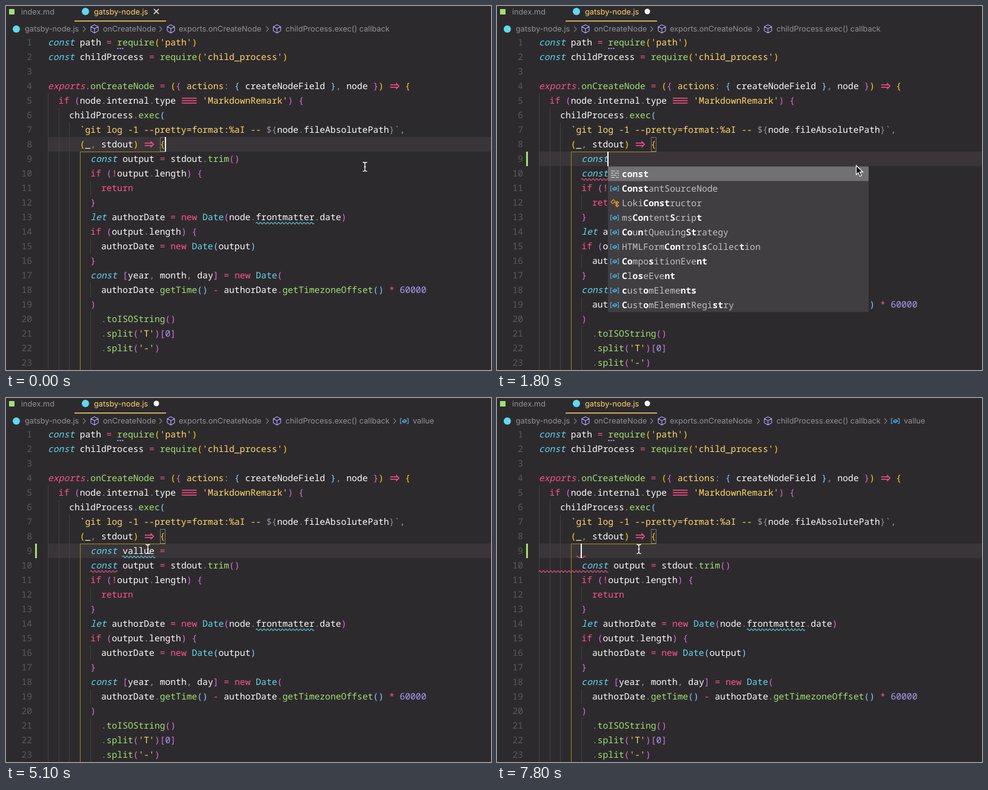
Write an HTML page that moves like this. It is 800 px wide and 600 px high and loops after 8000 ms.

```html
<!DOCTYPE html>
<html lang="en">
<head>
<meta charset="utf-8">
<title>Editor</title>
<style>
  html, body { margin: 0; width: 100%; height: 100%; overflow: hidden; background: #2d2a2e; }
  svg { display: block; width: 800px; height: 600px; background: #2d2a2e; }
  text { font: 14.667px "Noto Sans Mono", "DejaVu Sans Mono", monospace; white-space: pre; fill: #fcfcfa; text-rendering: geometricPrecision; }
  .ui { font: 12.7px Inter, Roboto, sans-serif; fill: #939293; }
  .small { font-size: 12px; fill: #ffd866; }
  .num { fill: #5b595c; text-anchor: end; }
  .kw { fill: #5fd9ee; font-style: italic; }
  .exp { fill: #ff5488; font-style: italic; }
  .type { fill: #5fd9ee; }
  .op { fill: #ff5488; }
  .fn { fill: #a3e071; }
  .str, .key { fill: #ffd866; }
  .lit { fill: #ab9df2; }
  .dim { fill: #939293; }
  .unused .id { fill: #a5a3a5; }
  .b0 { fill: #ffd700; } .b1 { fill: #da70d6; } .b2 { fill: #87cefa; }
  .row { fill: #c1c0c0; }
  .hit { fill: #fff; font-weight: 700; }
  .line { fill: none; }
</style>
</head>
<body>
<svg viewBox="0 0 800 600">
  <g id="back"></g><g id="fixed"></g><g id="below"></g><g id="front"></g>
</svg>
<script>
const LOOP = 8000, LEFT = 69, CHAR = 8.8, ROW = 24, TOP = 48;
const PINK = '#ff5488', BLUE = '#5fd9ee', PURPLE = '#ab9df2', GREY = '#939293';

const source = `const path = require('path')
const childProcess = require('child_process')

exports.onCreateNode = ({ actions: { createNodeField }, node }) => {
  if (node.internal.type === 'MarkdownRemark') {
    childProcess.exec(
      \`git log -1 --pretty=format:%aI -- \${node.fileAbsolutePath}\`,
      (_, stdout) => {
        const output = stdout.trim()
        if (!output.length) {
          return
        }
        let authorDate = new Date(node.frontmatter.date)
        if (output.length) {
          authorDate = new Date(output)
        }
        const [year, month, day] = new Date(
          authorDate.getTime() - authorDate.getTimezoneOffset() * 60000
        )
          .toISOString()
          .split('T')[0]
          .split('-')
          `.split('\n');

// What line 9 holds from each moment on
const typing = [
  [150, ''], [1350, 'c'], [1500, 'con'], [1650, 'cons'], [1800, 'const'],
  [1950, 'const '], [2100, 'const va'], [2250, 'const vall'], [2400, 'const vallu'],
  [2550, 'const vallue'], [3450, 'const vallue '], [3600, 'const vallue ='],
  [7200, 'const vallue '], [7350, 'const val'], [7500, 'const '], [7650, 'co'], [7800, '']
];
const caretOff = [[600, 1050], [3150, 3450], [4200, 4650], [5100, 5550], [6150, 6600], [7050, 7200]];
const pointer = [
  [0, 592, 265], [3900, 566, 279], [4050, 478, 293], [4200, 384, 292], [4350, 312, 279],
  [4500, 266, 263], [4650, 244, 253], [4800, 236, 249], [4950, 234, 249]
];
// Asterisks enclose the matched letters
const fullMatches = [
  '*const*', '*Const*antSourceNode', 'Loki*Const*ructor', 'ms*Con*tent*S*crip*t*',
  '*Co*u*n*tQueuing*St*rategy', 'HTMLForm*Con*trol*s*Collec*t*ion', '*Co*mpo*s*itionEve*nt*',
  '*C*l*os*eEve*nt*', '*c*ust*o*mEleme*nts*', '*C*ust*o*mEleme*n*tRegi*st*ry'
];
const earlyMatches = [
  '*cons*ole', '*const*', '*Cons*tantSourceNode', 'Loki*Cons*tructor', 'ms*Con*tent*S*cript',
  '*Con*volverNode', '*Co*u*n*tQueuing*S*trategy', 'HTMLForm*Con*trol*s*Collection',
  '*Co*mpo*s*itionEve*n*t', '*C*l*os*eEve*n*t', '*c*ust*o*mEleme*ns*', '*C*ust*o*mEleme*n*tRegi*s*try'
];

const rules = [
  ['str', /'[^']*'|`git[^$]*/y],
  ['dim', /\$\{|\}`,|[.,:]/y],
  ['kw', /(const|let)\b/y],
  ['exp', /exports\b/y],
  ['triple', /===/y],
  ['arrow', /=>/y],
  ['op', /(if|return|new)\b|[=!*-]/y],
  ['type', /Date\b/y],
  ['fn', /\w+(?=\()|onCreateNode/y],
  ['key', /actions\b/y],
  ['lit', /\d+/y],
  ['bracket', /[()[\]{}]/y],
  ['id', /\w+|\s+/y]
];
const colX = col => LEFT + col * CHAR;
const rowY = row => TOP + (row - 1) * ROW;
const stroke = (d, color, width = 1) => `<path class="line" d="${d}" stroke="${color}" stroke-width="${width}"/>`;
const rect = (x, y, w, h, color) => `<rect x="${x}" y="${y}" width="${w}" height="${h}" fill="${color}"/>`;
const dot = (x, y, r, color) => `<circle cx="${x}" cy="${y}" r="${r}" fill="${color}"/>`;
const label = (x, y, s, cls = '', fill) =>
  `<text x="${x}" y="${y}" class="${cls}"${fill ? ` style="fill:${fill}"` : ''}>${s}</text>`;
const span = (cls, s) => `<tspan class="${cls}">${s}</tspan>`;

let depth = 0;
function codeLine(line, row) {
  const y = rowY(row) + 12;
  let out = '', extra = '';
  for (let i = 0; i < line.length;) {
    for (const [kind, pattern] of rules) {
      pattern.lastIndex = i;
      const found = pattern.exec(line);
      if (!found) continue;
      const word = found[0], x = colX(i);
      if (kind === 'bracket') {
        const open = '([{'.includes(word);
        if (!open) depth--;
        out += span('b' + depth % 3, word);
        if (open) depth++;
      } else if (kind === 'arrow') {
        extra += stroke(`M${x + 1.5} ${y - 2}h12m0 4h-12M${x + 11} ${y - 5}l5 5l-5 5`, PINK, 1.4);
        out += '  ';
      } else if (kind === 'triple') {
        extra += stroke(`M${x + 1} ${y - 4}h24.5m0 4h-24.5m0 4h24.5`, PINK, 1.4);
        out += '   ';
      } else out += span(kind, word);
      i += word.length;
      break;
    }
  }
  return label(LEFT, y + 5, out) + extra;
}

function squiggle(x1, x2, row, color) {
  const halves = Math.max(1, Math.round((x2 - x1) / 3));
  return stroke(`M${x1} ${rowY(row) + 22}q1.5 -3 3 0${'t3 0'.repeat(halves - 1)}`, color, 1.2);
}

const chevron = x => stroke(`M${x - 2} 33.5l4 4.5l-4 4.5`, GREY, 1.1);
const cube = (x, y) => stroke(`M${x} ${y - 6.5}l6 3v7l-6 3.5l-6 -3.5v-7zm-6 3l6 3.5l6 -3.5m-6 3.5v7`, PURPLE, 1.2);
const variable = (x, y) => stroke(
  `M${x - 4} ${y - 4}h-2.5v8h2.5m8 -8h2.5v8h-2.5M${x - 3} ${y}l3.5 -2.5l3 1.5v2l-3.5 2l-3 -1.5zl3 1.2l3.5 -2`, '#4fb6e8', 1.1);

function fixedLayer() {
  let s = '';
  // Tabs; plain shapes stand for the file marks
  s += rect(5, 5, 9, 9, '#a3e071') + label(25, 14, 'index.md', 'ui');
  s += dot(131, 9, 6, BLUE) + label(145, 14, 'gatsby-node.js', 'ui', '#ffd866');
  s += rect(113, 24, 151, 1.5, '#ffd866');
  s += dot(17, 38, 6, BLUE);
  [[31, 'gatsby-node.js'], [160, 'onCreateNode'], [285, 'exports.onCreateNode'], [461, 'childProcess.exec() callback']]
    .forEach(([x, name]) => s += label(x, 42, name, 'ui'));
  [129, 255, 431].forEach(x => s += chevron(x));
  [146, 272, 447].forEach(x => s += cube(x, 37.5));
  // Indent guides
  [144, 168, 192].forEach((y, i) => s += rect(Math.round(colX(i * 2)), y, 1, 600 - y, '#454146'));
  s += stroke('M263 240.5H122.5V600', '#a68b12');
  s += `<rect x="254.5" y="216.5" width="8" height="23" fill="none" stroke="#77757a"/>`;
  for (let row = 1; row <= 23; row++) s += label(43, rowY(row) + 17, row, 'num');
  source.slice(0, 8).forEach((line, i) => s += codeLine(line, i + 1));
  [184.5, 188.5, 192.5].forEach(x => s += rect(x - 1, 69, 2, 2, PURPLE));
  return s;
}

function belowLayer() {
  return source.slice(8).map((line, i) => {
    const row = i + 9;
    const guide = line.startsWith(' '.repeat(10)) ? rect(139, rowY(row), 1, ROW, '#454146') : '';
    return guide + codeLine(line, row);
  }).join('') + squiggle(colX(39), colX(50), 13, BLUE);
}

function popup(x, items, selected) {
  const y = 264.5;
  let s = rect(x, y, 430, items.length * ROW, '#403e41') + rect(x, y + selected * ROW, 430, ROW, '#727072');
  items.forEach((item, i) => {
    const mid = y + i * ROW + 12.5, ix = x + 11;
    if (item === '*const*') s += stroke(`M${ix - 6} ${mid - 5}h7m2 0h4m-13 3.5h4m2 0h7m-13 3.5h9m2 0h2m-13 3.5h6m2 0h5`, '#e0e0e0', 1.2);
    else if (item.startsWith('Loki')) s += stroke(`M${ix - 6} ${mid - 2}l4 -4l3 3l-4 4zm6 1h4m-2 0v5h2m0 -7l2.5 2l-2.5 2l-2 -2zm0 5l2.5 2l-2.5 2l-2 -2z`, '#ee9d28', 1.2);
    else s += variable(ix, mid);
    const text = item.split('*').map((part, n) => n % 2 ? span('hit', part) : part).join('');
    s += label(x + 23, mid + 5, text, 'row');
  });
  return s;
}

function tooltip() {
  return rect(193, 153, 277, 88, '#403e41') + rect(193, 185, 277, 1, '#565458') +
    rect(193, 218, 277, 23, '#4d4b4e') +
    label(201.5, 174, span('kw', 'const') + ' ' + span('lit', 'vallue') + span('op', ':') + ' ' + span('kw', 'any')) +
    label(201.5, 207, '"vallue": Unknown word.') + label(409, 207, 'cSpell', 'dim') +
    label(201, 234, 'Peek Problem', 'ui small') + label(295, 234, 'Quick Fix...', 'ui small');
}

const beam = (x, y) => stroke(`M${x - 3.5} ${y - 7.5}q3.5 0 3.5 2.5v10q0 2.5 -3.5 2.5m7 -15q-3.5 0 -3.5 2.5m0 10q0 2.5 3.5 2.5m-5 -7.5h3`, '#fff', 1.3);
const arrow = (x, y) => `<path d="M${x} ${y}v15l3.5 -3.3l2.5 6l2.7 -1.2l-2.5 -5.8h4.8z" fill="#000" stroke="#fff" stroke-width="1.2"/>`;
const bulb = () => dot(81, 246, 5, '#3fa9f0') + rect(79, 250, 4, 5, '#3fa9f0') +
  `<circle cx="85" cy="252.5" r="2.6" fill="#2d2a2e" stroke="#3fa9f0" stroke-width="1.4"/>`;

const at = (table, t) => table.filter(step => step[0] <= t).pop();
const within = (t, from, to) => t >= from && t < to;

function backLayer(t) {
  const row = t < 150 ? 8 : 9;
  return rect(LEFT, rowY(row), 800 - LEFT, ROW, '#393539') + (t >= 300 ? rect(48, 240, 3, ROW, '#a3e071') : '');
}

function frontLayer(t) {
  const step = at(typing, t), typed = step ? step[1] : '';
  const end = step ? colX(8 + typed.length) : colX(22);
  let s = step ? dot(248, 9, 4.5, '#fcfcfa') : stroke('M244 5l8 8m0 -8l-8 8', '#fcfcfa', 1.4);
  if (t >= 2850) s += chevron(641) + variable(657, 38) + label(671, 42, 'vallue', 'ui');

  s += `<g class="${within(t, 3000, 3900) ? 'unused' : ''}">${codeLine(' '.repeat(8) + typed, 9)}</g>`;
  if (within(t, 1350, 1800)) s += squiggle(end, end + 9, 9, PINK) + squiggle(LEFT, 139, 10, PINK);
  if (within(t, 1800, 7800)) s += squiggle(139, 183, 10, PINK);
  if (t >= 7800) s += squiggle(131, 147, 9, PINK) + squiggle(LEFT, 183, 10, PINK);
  if (t >= 3000 && typed.length > 6) s += squiggle(192, Math.min(245, end), 9, BLUE);
  if (within(t, 3000, 3900)) s += bulb();

  if (!caretOff.some(([from, to]) => within(t, from, to)))
    s += rect(Math.round(end) - 1, rowY(step ? 9 : 8), 2, ROW, '#fcfcfa');
  if (within(t, 5400, 7200)) s += tooltip();
  const listed = within(t, 1500, 1950);
  if (listed) s += popup(Math.round(end), t < 1800 ? earlyMatches : fullMatches, t < 1800 ? 1 : 0);
  const [, x, y] = at(pointer, t);
  return s + (listed ? arrow(x + 0.5, y - 2) : beam(x, y));
}

const layer = id => document.getElementById(id);
layer('fixed').innerHTML = fixedLayer();
layer('below').innerHTML = belowLayer();

const shown = {};
function update(id, markup) {
  if (shown[id] !== markup) layer(id).innerHTML = shown[id] = markup;
}

let start;
function draw(now) {
  start ??= now;
  const t = (now - start) % LOOP;
  update('back', backLayer(t));
  update('front', frontLayer(t));
  layer('below').setAttribute('transform', `translate(0 ${t < 150 ? 0 : ROW})`);
  requestAnimationFrame(draw);
}
requestAnimationFrame(draw);
</script>
</body>
</html>
```
